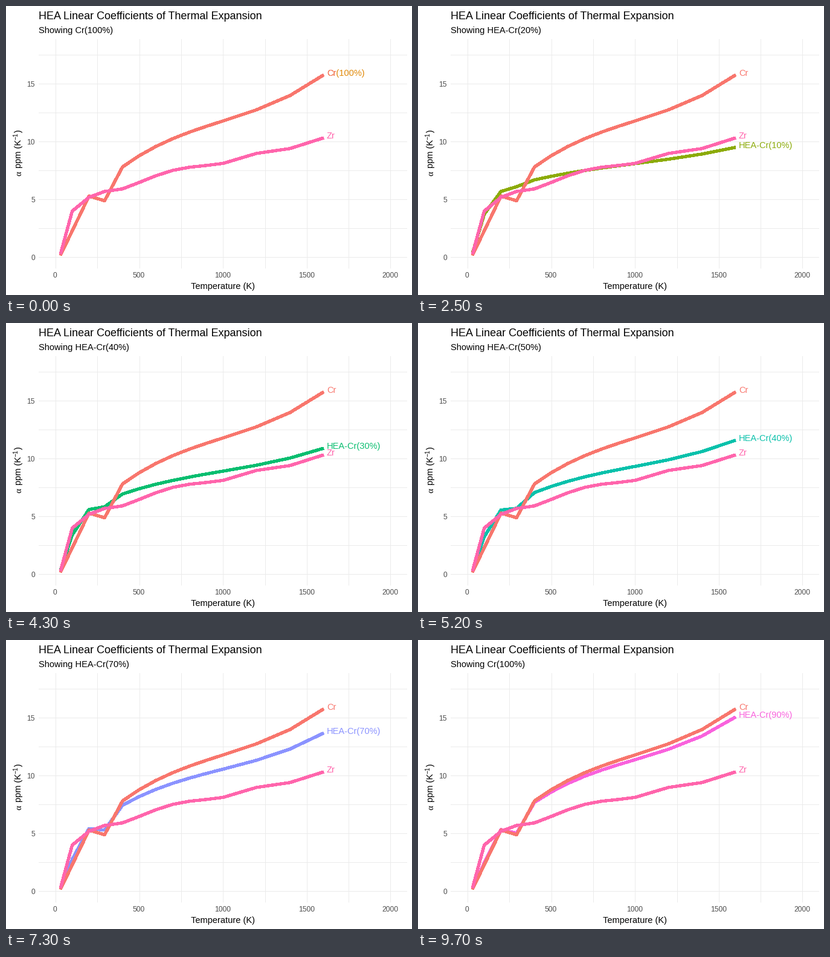
Write a matplotlib script that moves like this. It is 672 by 480 pixels and loops after 10 s.

```python
import numpy as np
import matplotlib.pyplot as plt
from matplotlib.animation import FuncAnimation

W, H, DPI = 672, 480, 96
N_FRAMES, INTERVAL = 100, 100
PT = 72 / DPI  # points per pixel
GRID, GREY = "#EBEBEB", "#4D4D4D"


def hue(i, n=13, chroma=100, light=65):
    """Colour i of n evenly spaced hues in polar CIE-LUV."""
    h = np.radians(15 + 360 * i / n)
    y = ((light + 16) / 116) ** 3
    u = chroma * np.cos(h) / (13 * light) + 0.19784
    v = chroma * np.sin(h) / (13 * light) + 0.46834
    x = 9 * y * u / (4 * v)
    z = 3 * y / v - 5 * y - x / 3
    rgb = np.array([3.2405 * x - 1.5371 * y - 0.4985 * z,
                    -0.9693 * x + 1.8760 * y + 0.0416 * z,
                    0.0556 * x - 0.2040 * y + 1.0572 * z]).clip(0.0031308, 1)
    return tuple((1.055 * rgb ** (1 / 2.4) - 0.055).clip(0, 1))


RED, PINK = hue(0), hue(12)
NAMES = ["Cr(100%)", "HEA"] + [f"HEA-Cr({p}%)" for p in range(10, 100, 10)]
STARTS = [0, 9, *range(19, N_FRAMES, 9)]

# Measured points below 400 K, smooth trends in u above
HIGH = np.array([*range(400, 1000, 100), *range(1000, 1601, 200)])
TEMP = np.array([30, 100, 200, 293, *HIGH])
u = (HIGH - 1000) / 200
s = np.sin(np.pi * u / 3)
step = np.sin(2 * np.pi * np.maximum(u, 0) / 3)
CR = np.array([0.2, 2.3, 5.3, 4.9, *(11.8 + 0.92 * u + 0.045 * u ** 3)])
ZR = np.array([0.3, 4.0, 5.2, 5.7,
               *(8.13 + 0.735 * u + 0.25 * s * (s - 1) + 0.18 * step)])
HEA = np.array([0.4, 3.9, 5.75, 6.25, *(7.7 + 0.31 * u + 0.007 * u ** 3)])


def px(t):
    return 81.95 + 0.27725 * t


def py(a):
    return 417.5 - 19.2 * a


fig = plt.figure(figsize=(W / DPI, H / DPI), dpi=DPI, facecolor="white")
ax = fig.add_axes([0, 0, 1, 1])
ax.set_xlim(0, W)
ax.set_ylim(H, 0)
ax.axis("off")


def text(x, y, s, size=14.67, color="black", font="Liberation Sans", **kw):
    return ax.text(x, y, s, fontsize=size * PT, color=color, family=font,
                   va="baseline", **kw)


def curve(values, color, z):
    return ax.plot(px(TEMP), py(values), color=color, lw=4.3 * PT, zorder=z,
                   antialiased=False, solid_capstyle="butt",
                   solid_joinstyle="round")[0]


def label_y(value):
    return py(value) + 1.2


def end_label(s, value, color, z):
    return text(530.8, label_y(value), s, color=color, zorder=z)


# Grid
grid = dict(color=GRID, lw=PT, antialiased=False, snap=False,
            solid_capstyle="butt", zorder=0)
for t in range(0, 2001, 250):
    x = np.floor(px(t) + 0.5) + 0.5
    ax.plot([x, x], [55, 436], **grid)
for a in np.arange(0, 18, 2.5):
    ax.plot([54, 664], [py(a), py(a)], **grid)

# Ticks and titles
for t in range(0, 2001, 500):
    text(px(t) - 0.6, 451, str(t), 12, GREY, ha="center")
for a in range(0, 16, 5):
    text(47.8, py(a) + 4.5, str(a), 12, GREY, ha="right")
text(54, 22, "HEA Linear Coefficients of Thermal Expansion", 17.95)
subtitle = text(54, 45, "")
text(359, 469.6, "Temperature (K)", ha="center")

up = dict(rotation=90, rotation_mode="anchor", ha="left")
text(25, 282.5, "\u03b1", font="Liberation Serif", **up)
text(25, 269, "ppm (K", **up)
text(20, 221.5, "\u22121", 10.3, **up)
text(25, 210, ")", **up)

# Curves
mix_line = curve(CR, RED, 2)
curve(CR, RED, 3)
curve(ZR, PINK, 4)
mix_label = end_label("", CR[-1], RED, 5)
end_label("Cr", CR[-1], RED, 6)
end_label("Zr", ZR[-1], PINK, 7)


def state_at(frame):
    return int(np.searchsorted(STARTS, frame % N_FRAMES, side="right")) - 1


def draw(frame):
    k = state_at(frame)
    share = (k - 1) / 10 if k else 1
    values = HEA + share * (CR - HEA)
    mix_line.set_ydata(py(values))
    mix_line.set_color(hue(k + 1))
    mix_label.set_text(NAMES[k])
    mix_label.set_color(hue(k + 1))
    mix_label.set_y(label_y(values[-1]))
    # The subtitle runs three steps ahead of the curve
    subtitle.set_text("Showing " + NAMES[state_at(frame + 3)])
    return mix_line, mix_label, subtitle


anim = FuncAnimation(fig, draw, frames=N_FRAMES, interval=INTERVAL,
                     repeat=True, repeat_delay=0, blit=False)
plt.show()
```
